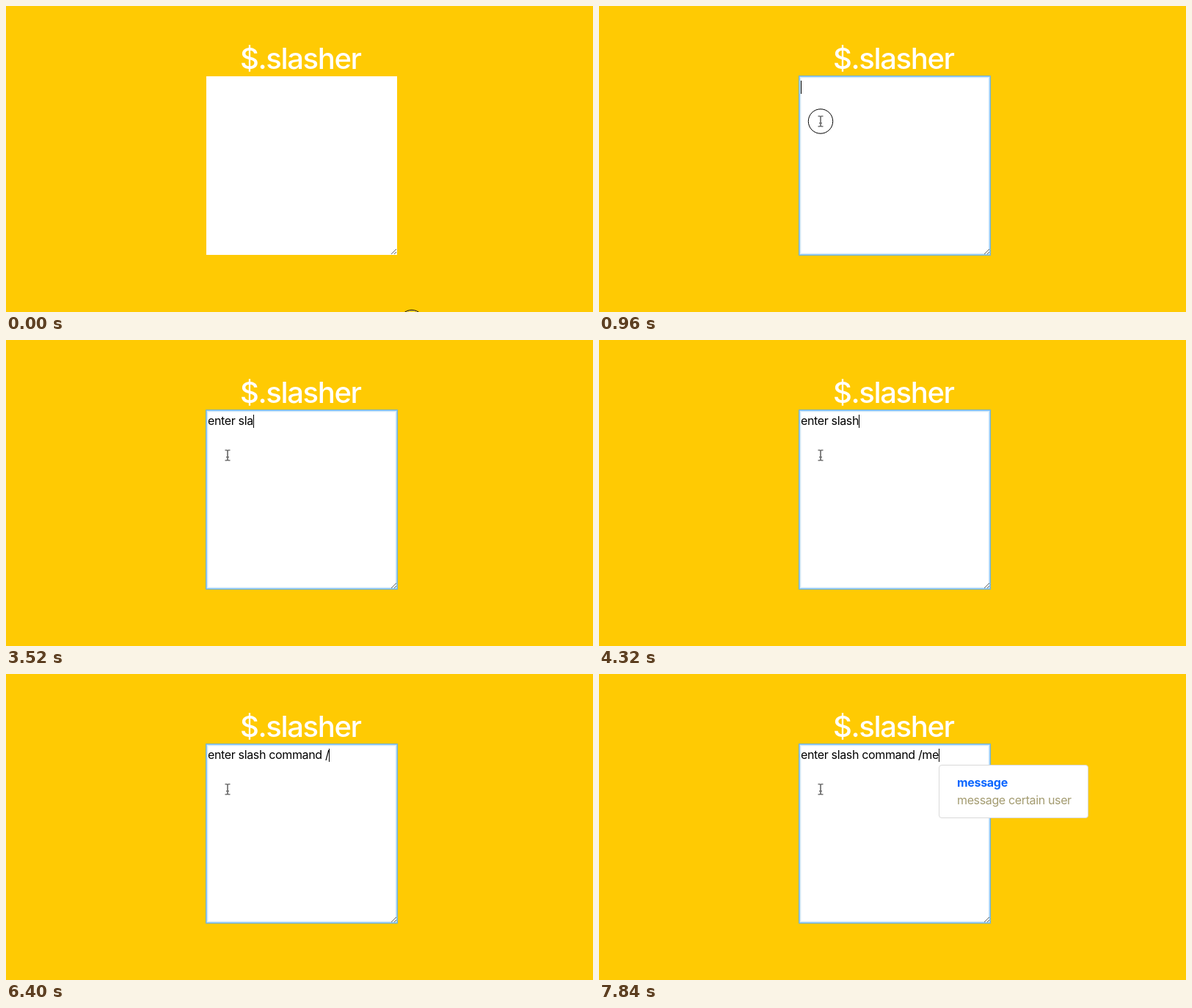
An HTML page for the animation above (8000 ms loop, 800 by 418 pixels).

```html
<!DOCTYPE html>
<html lang="en">
<head>
<meta charset="utf-8">
<title>$.slasher</title>
<style>
html, body { margin: 0; width: 100%; height: 100%; overflow: hidden; background: #ffca03; }
#stage { position: relative; width: 800px; height: 418px; overflow: hidden; font: 16px/24px Inter, sans-serif; }
#stage > * { position: absolute; box-sizing: border-box; white-space: pre; }
h1 { margin: 0; left: 319px; top: 48px; color: #fff; font-size: 40px; font-weight: 550; line-height: 48px; letter-spacing: -1.35px; }
#box { left: 273px; top: 96px; width: 260px; height: 244px; background: #fff; }
#box.focus { box-shadow: 0 0 0 1px #72b2d8, inset 0 0 0 1px #9bcdf2, inset 0 0 0 2px #d3e9fa, inset 0 0 0 3px #f1f8fe; }
#line { left: 275px; top: 98px; color: #000; letter-spacing: -.35px; }
#caret { display: inline-block; width: 1px; height: 18px; margin-right: -1px; vertical-align: -4px; background: #000; }
#menu { left: 463px; top: 124px; width: 204px; height: 73px; padding: 11px 24px; background: #fff;
  border: 1px solid #d9d9d9; border-radius: 4px; letter-spacing: -.36px; color: #a39b70; }
#menu b { display: block; color: #0b66ff; font-weight: 700; letter-spacing: -.3px; }
svg { left: 0; top: 0; width: 800px; height: 418px; fill: none; }
</style>
</head>
<body>
<div id="stage">
  <h1>$.slasher</h1>
  <div id="box"></div>
  <div id="line"><span id="text"></span><span id="caret"></span></div>
  <div id="menu"><b>message</b>message certain user</div>
  <svg viewBox="0 0 800 418">
    <path d="M525 339l7-7M529 339l3-3" stroke="#666"/>
    <g id="mouse">
      <g id="ring"><circle r="16" stroke="#fff" stroke-opacity=".6"/><circle r="16.7" stroke="#000"/></g>
      <path id="arrow" d="M0 0v16l4-4 3 7 3-1-3-7h5z" fill="#000" stroke="#fff"/>
      <path id="beam" d="M-3.5-7h2.5l1 1 1-1h2.5M0-6v12M-2 2.5h4M-3.5 7h2.5l1-1 1 1h2.5" stroke="#707070" stroke-width="1.7"/>
    </g>
  </svg>
</div>
<script>
const LOOP = 8000;
const $ = id => document.getElementById(id);

// [ms, x, y]
const moves = [[0, 553, 432], [160, 490, 350], [320, 370, 230], [480, 294, 160], [800, 302, 157.5]];

// [ms, text, caret visible]
const typing = [
  [0, '', 0], [960, '', 1], [1440, '', 0], [1920, '', 1],
  [2240, 'e', 1], [2400, 'ent', 1], [2560, 'ente', 1], [2720, 'enter', 1],
  [3040, 'enter ', 1], [3360, 'enter s', 1], [3520, 'enter sla', 1], [4000, 'enter sla', 0],
  [4160, 'enter slas', 1], [4320, 'enter slash', 1], [4640, 'enter slash ', 1],
  [4800, 'enter slash c', 1], [4960, 'enter slash com', 1], [5120, 'enter slash comman', 1],
  [5600, 'enter slash comman', 0], [5760, 'enter slash command', 1], [5920, 'enter slash command ', 1],
  [6400, 'enter slash command /', 1], [6880, 'enter slash command /me', 1],
  [7360, 'enter slash command /me', 0], [7840, 'enter slash command /me', 1]
];

const at = (steps, t) => steps.findLast(s => s[0] <= t);
const show = (id, on) => { $(id).style.visibility = on ? 'visible' : 'hidden'; };

function draw(t) {
  const [, x, y] = at(moves, t);
  const [, text, caret] = at(typing, t);
  const inBox = x > 273 && x < 533 && y > 96 && y < 340;
  $('mouse').setAttribute('transform', `translate(${x} ${y})`);
  show('arrow', !inBox);
  show('beam', inBox);
  show('ring', t < 160 || (t >= 960 && t < 1120));
  $('box').className = t >= 960 ? 'focus' : '';
  $('text').textContent = text;
  show('caret', caret);
  show('menu', t >= 6880);
}

const start = performance.now();
function tick() {
  draw((performance.now() - start) % LOOP);
  requestAnimationFrame(tick);
}
tick();
</script>
</body>
</html>
```
